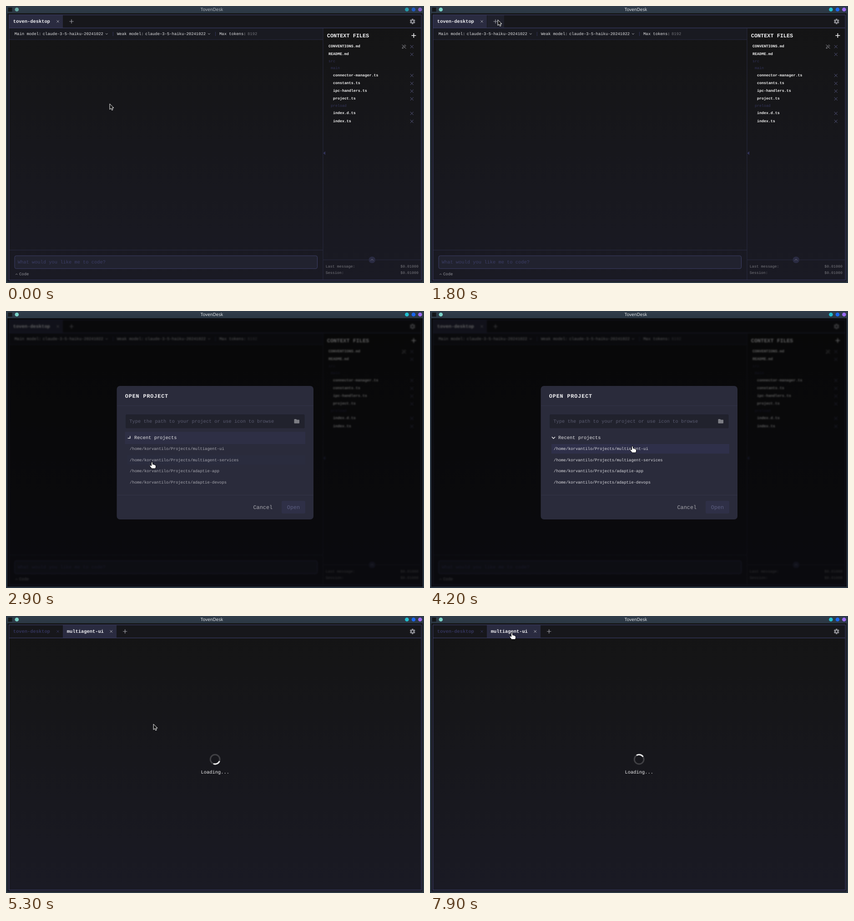
Write an HTML page that moves like this. It is 919 px wide and 610 px high and loops after 8000 ms.

```html
<!DOCTYPE html>
<html lang="en">
<head>
<meta charset="utf-8">
<title>TovenDesk</title>
<style>
  html, body { margin: 0; width: 100%; height: 100%; overflow: hidden; background: #2b3642; }
  svg { display: block; width: 919px; height: 610px; }
  text { font-family: "Liberation Mono", "Noto Sans Mono", monospace; white-space: pre; text-rendering: geometricPrecision; }
  .b { font-weight: bold; }
  .ui { font-family: "Noto Sans", sans-serif; }
</style>
</head>
<body>
<svg id="stage" viewBox="0 0 919 610"></svg>
<script>
const XS = 8.3, SM = 8.89, MD = 10.4, LG = 11.85;
const LINE = '#37395f', SOFT = '#282a40', DIM = '#33345a', GREY = '#8c8c92', LIGHT = '#e4e4e6';

// y is the vertical middle of the letters
const text = (x, y, s, size, fill, more = '') =>
  `<text x="${x}" y="${y + size * 0.3}" font-size="${size}" fill="${fill}" ${more}>${s}</text>`;
const bold = (x, y, s, size, fill, more = '') => text(x, y, s, size, fill, 'class="b" ' + more);
const rect = (x, y, w, h, fill, more = '') =>
  `<rect x="${x}" y="${y}" width="${w}" height="${h}" fill="${fill}" ${more}/>`;
const path = (d, color, w = 1, more = '') =>
  `<path d="${d}" fill="none" stroke="${color}" stroke-width="${w}" ${more}/>`;
const dot = (x, y, r, fill, more = '') => `<circle cx="${x}" cy="${y}" r="${r}" fill="${fill}" ${more}/>`;
const cross = (x, y, r, color, w = 1) =>
  path(`M${x - r},${y - r}l${2 * r},${2 * r}m0,${-2 * r}l${-2 * r},${2 * r}`, color, w);
const plus = (x, y, r, color, w) => path(`M${x - r},${y}h${2 * r}M${x},${y - r}v${2 * r}`, color, w);
const chevron = (x, y, r, color, up = 1, w = 1) =>
  path(`M${x - r},${y - up * r / 2}l${r},${up * r}l${r},${-up * r}`, color, w);
const group = (id, body) => `<g id="${id}">${body}</g>`;

function gear(x, y) {
  let teeth = '';
  for (let a = 0; a < 360; a += 60)
    teeth += rect(x - 1.6, y - 6, 3.2, 4, GREY, `transform="rotate(${a} ${x} ${y})"`);
  return teeth + `<circle cx="${x}" cy="${y}" r="3.2" fill="none" stroke="${GREY}" stroke-width="2.5"/>`;
}

function contextFiles() {
  const rows = [
    [709, 89, 'CONVENTIONS.md'], [709, 106, 'README.md'], [709, 122, 'src', 1], [714, 136.5, 'main', 1],
    [719, 152.5, 'connector-manager.ts'], [719, 170, 'constants.ts'], [719, 187, 'ipc-handlers.ts'],
    [719, 204, 'project.ts'], [714, 220, 'preload', 1], [719, 236, 'index.d.ts'], [719, 253.5, 'index.ts']
  ];
  return rows.map(([x, y, name, folder]) => folder
    ? text(x, y, name, XS, DIM)
    : bold(x, y, name, XS, '#f0f0f0') + cross(892.3, y + 0.5, 3.4, '#565880')).join('');
}

function model(x, label) {
  return text(x, 61.5, label + ' model:', SM, LIGHT) +
    text(x + 62, 61.5, 'claude-3-5-haiku-20241022', SM, LIGHT) +
    chevron(x + 202.5, 61.5, 2.2, '#c8c8cc') + path(`M${x + 216.5},57v9`, DIM);
}

const titleBar =
  rect(0, 0, 919, 16, 'url(#bar)') + rect(4.5, 3.5, 9, 9, '#15171a') +
  group('lights',
    text(452.5, 7.6, 'TovenDesk', 9.8, '#dde1e4', 'class="ui" text-anchor="middle"') +
    dot(23.8, 7.7, 4.3, '#7ad3c8') + dot(881.4, 7.7, 4.3, '#20bfd0') +
    dot(896, 7.7, 4.3, '#1a66f0') + dot(910.4, 7.7, 4.3, '#9b6cf6'));

const firstTab =
  group('firstOn', rect(7, 20, 118, 28, '#2a2b40') + bold(15.8, 34, 'toven-desktop', MD, '#f2f2f4') + cross(114, 34, 2.6, '#a0a0a8')) +
  group('firstOff', bold(15.8, 34, 'toven-desktop', MD, DIM) + cross(114, 34, 2.6, DIM));

const secondTab = group('second',
  rect(125, 20, 118, 28, '#2a2b40') + bold(133.8, 34, 'multiagent-ui', MD, '#f2f2f4') +
  cross(231.3, 34, 2.6, '#b0b0b8') + plus(261.7, 34, 4.6, '#a0a0a8', 1.2));

const frame = rect(7, 20, 906, 28, '#17171b') + firstTab + secondTab +
  group('addTab', rect(126, 20, 37, 28, '#1f202b', 'id="addHover"') + plus(144, 34, 4.6, '#a0a0a8', 1.2)) +
  gear(893.8, 34) +
  rect(6.5, 19.5, 906.8, 584, 'none', `stroke="${LINE}" stroke-width="1.3"`) + path('M7,48.3h906', LINE, 1.3);

const home = group('home',
  rect(7, 49, 690, 25, '#191a21') + path('M7,74h690', SOFT) +
  model(18.8, 'Main') + model(244, 'Weak') +
  text(469, 61.5, 'Max tokens:', SM, LIGHT) + text(531, 61.5, '8192', SM, '#74747a') +
  path('M7,537.5h690M697,49v554M697,559h216', SOFT) +
  `<path d="M702,320v8l-4.500,-4z" fill="${DIM}"/>` +
  bold(705.8, 65, 'CONTEXT FILES', LG, '#f2f2f4') + plus(896.4, 65, 5, '#f2f2f4', 1.6) +
  contextFiles() +
  path('M871,93.500l1,-3l5,-5l2,2l-5,5zM870.500,85l9,9', GREY) +
  rect(19, 550, 665.5, 28.3, '#21222f', 'rx="3.5" stroke="#3d3f66"') +
  text(25.7, 564.3, 'What would you like me to code?', MD, '#3c3e66') +
  chevron(23.2, 590.7, 2.2, GREY, -1) + text(29, 590.8, 'Code', SM, '#96969c') +
  dot(804.8, 559, 7.3, '#2a2b42') + chevron(804.8, 559, 3, '#77788c', -1) +
  [['Last message:', 573.4], ['Session:', 587.8]].map(([s, y]) => text(702.8, y, s, XS, '#77777d') +
    text(907, y, '$0.01000', XS, '#77777d', 'text-anchor="end"')).join(''));

const loading = group('loading',
  `<g fill="none" stroke-width="3"><circle cx="459.700" cy="315.700" r="10.400" stroke="#404044"/>` +
  `<path id="spin" d="M452.350,308.350a10.400,10.400 0 0 1 14.700,0" stroke="#e8e8e8"/></g>` +
  text(459.8, 343.5, 'Loading...', MD, '#ececee', 'text-anchor="middle"'));

const ROW = 24.6, FOLD = 2 * ROW;
const rowY = i => 303.5 + i * ROW;
const projects = ['multiagent-ui', 'multiagent-services', 'adaptie-app', 'adaptie-devops'];
const modal = group('modal',
  rect(3, 16, 913, 591, '#000', 'opacity=".6"') +
  rect(243.5, 165, 432.5, 294, '#2a2b3b', 'rx="7" id="panel"') +
  group('upper',
    bold(261.8, 187, 'OPEN PROJECT', LG, '#f2f2f4', 'letter-spacing=".07em"') + path('M244,208.500h432', '#323347') +
    rect(262.3, 227, 395, 32, '#21222d', 'rx="3" stroke="#2c2d40"') +
    text(271.3, 243, 'Type the path to your project or use icon to browse', MD, '#5a5b70') +
    '<path d="M633.500,239q0,-1 1,-1h3.500l1.500,1.500h4.500q1,0 1,1v6q0,1 -1,1h-9.500q-1,0 -1,-1z" fill="#7c7d84"/>' +
    rect(261.5, 266, 396.5, 27, '#2e2f45', 'id="recentHover"') +
    path('M269.700,275.500l3.600,3.600l-3.600,3.600', LIGHT, 1.5, 'id="arrow"') +
    text(282, 279.3, 'Recent projects', MD, LIGHT)) +
  group('rows', rect(267, 0, 391, 21, '#2f304a', 'id="rowHover"') +
    projects.map((p, i) => text(272, rowY(i), '/home/korvantilo/Projects/' + p, SM, '#dcdce0')).join('')) +
  group('lower',
    path('M244,405.500h432', '#323347') + text(543.5, 432, 'Cancel', LG, '#a6a6ac') +
    rect(606, 418, 52, 28, '#2f3047', 'rx="3"') + text(617.8, 432, 'Open', LG, '#5c5e80')));

const pointer =
  '<path id="arrowCursor" d="M0,0V12.300L2.900,9.700L4.800,14L7,13L5.200,8.900H9z" fill="#111" stroke="#fff" stroke-linejoin="round"/>' +
  '<path id="handCursor" d="M-1.500,8V1Q-1.500,-.5 0,-.5Q1.400,-.5 1.400,1V4.500Q3.500,4 4,5.300Q6,5 6.400,6.200Q8.500,6 8.500,8V11Q8,12 7.500,14H-.5L-5,8.500Q-5.500,6.500 -3.500,6.500Z" fill="#fff" stroke="#000"/>';

const stage = document.getElementById('stage');
stage.innerHTML = `<defs>
  <linearGradient id="bar" x2="0" y2="1"><stop stop-color="#313d4a"/><stop offset="1" stop-color="#2b3743"/></linearGradient>
  <linearGradient id="body" x2="0" y2="1"><stop stop-color="#141414"/><stop offset="1" stop-color="#1a1a24"/></linearGradient>
</defs>` + rect(0, 0, 919, 610, '#2b3642') + rect(3, 16, 913, 591, 'url(#body)') + titleBar +
  group('app', frame + home + loading) + modal + group('cursor', pointer);

const el = id => document.getElementById(id);
const show = (id, on) => el(id).style.display = on ? '' : 'none';
const move = (id, x, y) => el(id).setAttribute('transform', `translate(${x} ${y})`);

// time, x, y of the pointer's hot spot
const route = [
  [0, 228, 215.5], [200, 228, 215.5], [500, 140, 120], [800, 50, 20], [900, 68, 14], [1100, 128, 18],
  [1200, 157, 22], [1300, 158, 27], [1400, 149, 30.5], [2000, 149, 30.5], [2400, 240, 200],
  [2800, 321, 333], [2900, 321, 333], [3400, 400, 309], [3800, 438, 298], [4000, 438, 298],
  [4200, 445, 298], [4800, 445, 298], [5400, 300, 226], [6900, 300, 226], [7300, 291, 207],
  [7600, 225, 95], [7800, 182, 42], [7900, 180, 37.5]
];

function pointerAt(t) {
  const i = route.findIndex(p => p[0] >= t);
  if (i < 1) return route[0].slice(1);
  const [a, b] = [route[i - 1], route[i]];
  const k = (t - a[0]) / (b[0] - a[0]);
  return [a[1] + (b[1] - a[1]) * k, a[2] + (b[2] - a[2]) * k];
}

function draw(t) {
  const [x, y] = pointerAt(t);
  const open = t >= 1900 && t < 4700, busy = t >= 4800, wide = t >= 2900;

  el('lights').style.opacity = t < 1800 ? 0.72 : 1;
  show('firstOn', !busy);
  show('firstOff', busy);
  show('second', busy);
  show('addTab', !busy);
  show('addHover', !open && y > 16 && y < 48 && x > 125 && x < 163);
  show('home', !busy);
  show('loading', busy);
  el('spin').setAttribute('transform', `rotate(${228 + (t - 6500) * 0.36} 459.7 315.7)`);

  show('modal', open);
  el('app').style.filter = open ? 'blur(1.5px)' : '';
  const fold = wide ? 0 : FOLD;
  el('panel').setAttribute('y', 165 + fold);
  el('panel').setAttribute('height', 294 - 2 * fold);
  move('upper', 0, fold);
  move('lower', 0, -fold);
  show('rows', wide);
  el('rows').style.opacity = t < 3000 ? 0.7 : 1;
  const turn = Math.max(0, Math.min(90, (t - 2800) * 0.45));
  el('arrow').setAttribute('transform', `rotate(${turn} 271.5 279.1)`);
  const onRecent = x > 262 && x < 658 && y > 266 + FOLD && y < 293 + FOLD;
  show('recentHover', t < 3000 && onRecent);
  const row = Math.max(0, Math.min(3, Math.round((y - 303.5) / ROW)));
  el('rowHover').setAttribute('y', rowY(row) - 10.5);
  el('rowHover').style.opacity = t < 3000 ? 0.4 : 1;

  const onTab = !open && y > 20 && y < 48 && x < (busy ? 243 : 125);
  const hand = onTab || (open && (wide || onRecent));
  move('cursor', x, y);
  show('handCursor', hand);
  show('arrowCursor', !hand);
}

function tick(now) {
  draw(Math.floor(now % 8000 / 100) * 100);
  requestAnimationFrame(tick);
}
draw(0);
requestAnimationFrame(tick);
</script>
</body>
</html>
```
